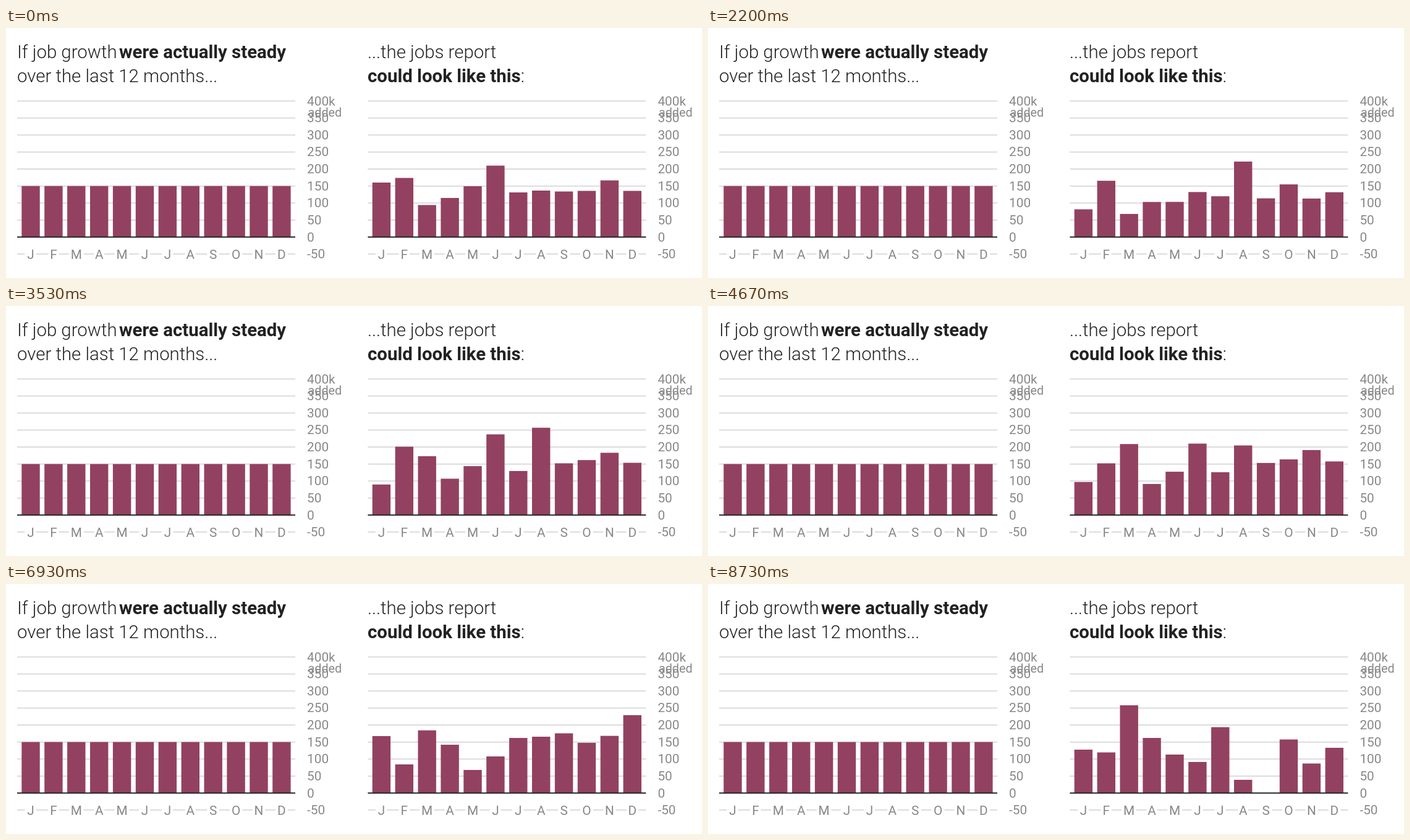
Write an HTML page that moves like this. It is 1126 px wide and 406 px high and loops after 9.07 s.

```html
<!DOCTYPE html>
<html lang="en">
<head>
<meta charset="utf-8">
<title>Job growth</title>
<style>
  html, body { margin: 0; width: 100%; height: 100%; overflow: hidden; background: #fff; }
  svg { display: block; width: 100%; height: 100%; font-family: Roboto, "Liberation Sans", sans-serif; }
  .title { font-size: 29.4px; font-weight: 300; fill: #222; }
  .title .strong { font-weight: 700; }
  .label { font-size: 20.8px; fill: #888; }
  .unit { font-size: 19.8px; }
  .month { text-anchor: middle; stroke: #fff; stroke-width: 9px; paint-order: stroke; }
  .grid { stroke: #dcdcdc; stroke-width: 2; }
  .zero { stroke: #222; stroke-width: 2; }
  .bar { fill: #934161; }
</style>
</head>
<body>
<svg viewBox="0 0 1126 406">
  <text class="title" x="18" y="49">If job growth <tspan class="strong" x="183">were actually steady</tspan></text>
  <text class="title" x="18" y="88">over the last 12 months...</text>
  <text class="title" x="585" y="49">...the jobs report</text>
  <text class="title" x="585" y="88"><tspan class="strong">could look like this</tspan>:</text>
</svg>
<script>
const LOOP = 9070, FIRST_MOVE = 915, INTERVAL = 1200, MOVE = 320;
const ZERO_Y = 339.5, STEP_Y = 27.62;
const svg = document.querySelector("svg");

// Top edge of each monthly bar, one row per simulated year.
const years = [
  [251, 243.5, 287.5, 276, 257, 223.5, 267, 264, 265.5, 264.5, 247.5, 264.5],
  [295.8, 251.1, 303.8, 285.9, 283.2, 268.9, 276.3, 213.4, 281.2, 251.7, 280.1, 267.4],
  [278.5, 212.5, 280, 242.5, 273, 236.5, 237, 258.5, 222, 281, 239.5, 258.5],
  [291.7, 231, 238.2, 286.5, 258, 204, 272.9, 188, 260.8, 245.3, 238.2, 254],
  [279.1, 283.9, 208, 292, 282, 246, 266.6, 271, 248, 253.5, 229, 250.6],
  [247, 293, 237.7, 261, 302, 280, 250, 248, 242.5, 257.9, 246.6, 213],
  [258.5, 245, 226, 302, 258.5, 285.5, 288.5, 290.5, 259.5, 221, 317.5, 254.5],
  [269, 273.5, 197, 250, 277, 289, 232.5, 318, ZERO_Y, 252.5, 291.5, 266]
];

function add(tag, attributes, text = "") {
  const node = document.createElementNS("http://www.w3.org/2000/svg", tag);
  for (const name in attributes) node.setAttribute(name, attributes[name]);
  node.textContent = text;
  return svg.appendChild(node);
}

function setTop(bar, y) {
  bar.setAttribute("y", y);
  bar.setAttribute("height", Math.max(0, ZERO_Y - y));
}

function drawChart(left) {
  const rule = (y, kind) => add("line", { x1: left, x2: left + 450, y1: y, y2: y, class: kind });
  const label = (x, y, text, kind = "") => add("text", { x: left + x, y, class: "label " + kind }, text);

  for (let value = -50; value <= 400; value += 50) {
    const y = ZERO_Y - value / 50 * STEP_Y;
    if (value) rule(y, "grid");
    label(469, y + 7, value === 400 ? "400k" : value);
  }
  label(470.5, 144, "added", "unit");

  const bars = [..."JFMAMJJASOND"].map((month, i) => {
    const x = 7.3 + i * 36.9;
    label(x + 14.7, 374.5, month, "month");
    const bar = add("rect", { x: left + x, width: 29.4, class: "bar" });
    setTop(bar, ZERO_Y - 3 * STEP_Y);
    return bar;
  });
  rule(ZERO_Y, "zero");
  return bars;
}

const easeInOut = p => p < 0.5 ? 4 * p ** 3 : 1 - 4 * (1 - p) ** 3;

drawChart(18);
const reportBars = drawChart(585.4);

function render(now) {
  const elapsed = now % LOOP - FIRST_MOVE;
  const move = Math.max(0, Math.floor(elapsed / INTERVAL));
  const progress = Math.min(1, Math.max(0, (elapsed - move * INTERVAL) / MOVE));
  const mix = easeInOut(progress);
  reportBars.forEach((bar, i) => {
    const from = years[move][i], to = years[move + 1][i];
    setTop(bar, from + (to - from) * mix);
  });
  requestAnimationFrame(render);
}
render(performance.now());
</script>
</body>
</html>
```
